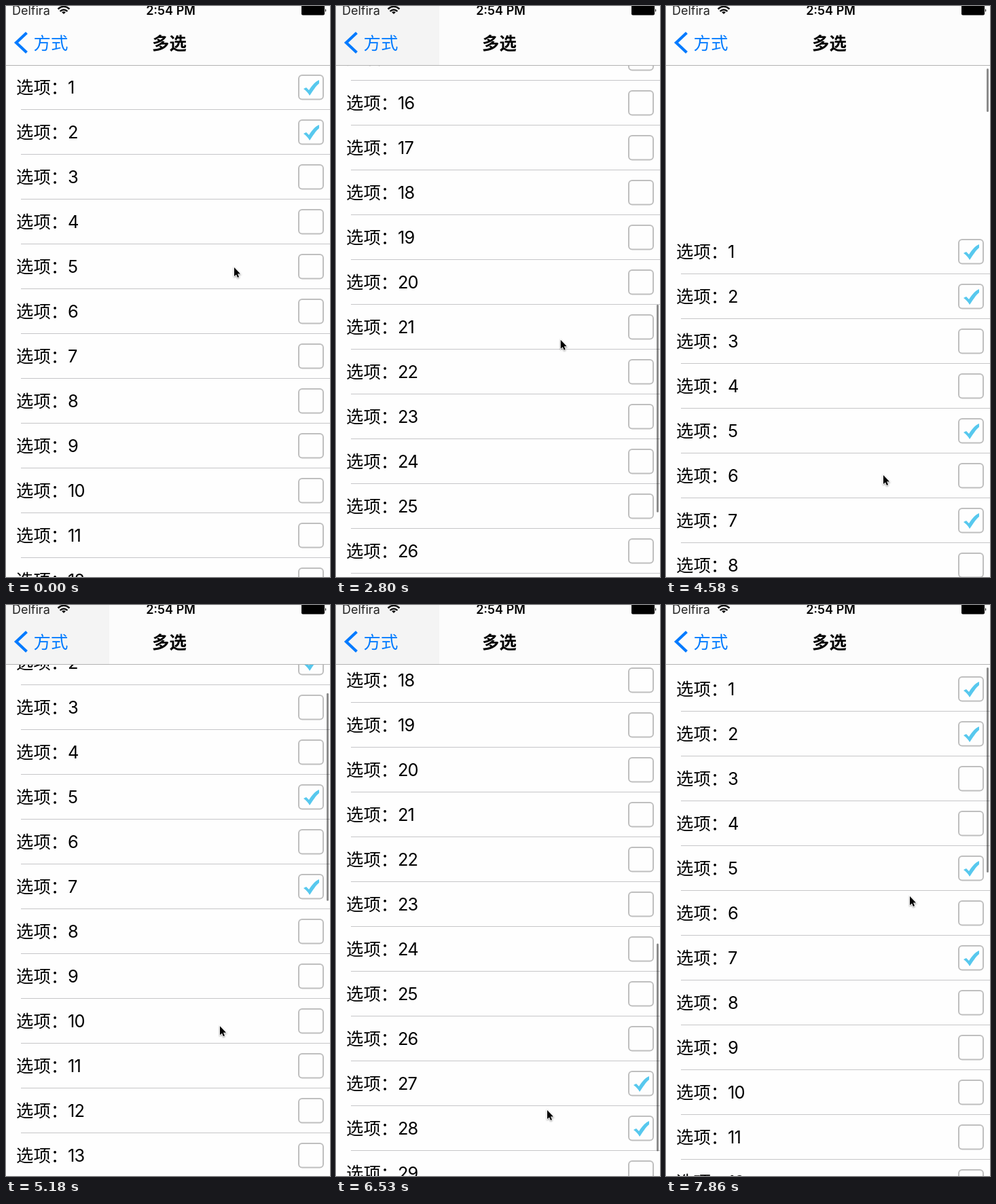
These frames come from a looping animation (477 px wide and 841 px high, 8 s). An HTML page:

```html
<!DOCTYPE html>
<html lang="zh-CN">
<head>
<meta charset="utf-8">
<title>多选</title>
<style>
  html, body { margin: 0; width: 100%; height: 100%; overflow: hidden; background: #fefefe; }
  svg { display: block; width: 100vw; height: 100vh; }
  text { font-family: Inter, Roboto, sans-serif; }
  .cjk { font-family: "Noto Sans CJK SC", "Noto Sans CJK JP", "Noto Sans CJK", sans-serif; font-size: 25.4px; }
  .number { font-size: 25.4px; letter-spacing: -.9px; }
  .box { fill: #fefefe; stroke: #bfbfbf; stroke-width: 2; }
  .line { fill: #c6c6c8; }
  #cursor { filter: drop-shadow(0 1px 1px #0006); }
</style>
</head>
<body>
<svg viewBox="0 0 477 841" preserveAspectRatio="none">
  <defs>
    <path id="tick" fill="#57c8ee"
      d="M438 35 L442 33 L446 37 C450 31 454 25 461 22 V27 C456 31 452 38 447 45 C445 41 442 38 438 35Z"/>
  </defs>
  <rect width="477" height="841" fill="#fefefe"/>
  <g id="list"></g>
  <rect id="bar" x="472" width="3" rx="1.5"/>

  <rect width="477" height="87" fill="#fcfcfc"/>
  <rect id="shade" width="152" height="87" fill="#f4f4f4"/>
  <rect y="87" width="477" height="1" fill="#b2b2b2"/>
  <text x="9" y="12.5" font-size="18" fill="#222">Delfira</text>
  <g fill="none" stroke="#111" stroke-width="2.4">
    <path d="M76.5 4.5 Q85 -3 93.5 4.5 M79.5 7.8 Q85 3 90.500 7.8"/>
    <path d="M82 9 Q85 7 88 9 L85 12Z" fill="#111" stroke="none"/>
  </g>
  <text x="242.5" y="12.5" font-size="18" font-weight="600" text-anchor="middle">2:54 PM</text>
  <rect x="435" y="-2" width="34" height="15.5" rx="2"/>
  <path d="M470 4 Q472.5 6.5 470 9Z"/>
  <path d="M30.5 39.5 L15 54 L30.5 68.5" fill="none" stroke="#007aff" stroke-width="4.2"/>
  <text class="cjk" x="40.5" y="63.5" fill="#007aff">方式</text>
  <text class="cjk" x="240.5" y="63.5" font-weight="700" text-anchor="middle">多选</text>

  <path id="cursor" d="M0 1 V14 L3 11.500 L5 16 L7 15 L5 10.500 H9Z"
    stroke="#fff" stroke-width="1.5" paint-order="stroke"/>
</svg>
<script>
const LOOP = 8000, STEP = 148.2, LEAD = 16, LAST = 53;
const ROWS = 30, ROW_H = 66, TOP = 87, MAX = 1224, BAR_H = 306;
const $ = id => document.getElementById(id);

// Option: step at which it becomes checked
const checkedAt = { 1: 0, 2: 0, 5: 4, 7: 7, 27: 41, 28: 42 };

// Gesture ends: step, list offset, pointer x and y
const keys = [
  [0, 0, 336, 384], [3, 0, 441, 380], [4, 0, 441, 380], [7, 0, 441, 511], [8, 0, 400, 505],
  [15, 233, 290, 407], [21, MAX, 345, 520], [23, MAX, 373, 699], [31, -242, 320, 690],
  [34, 0, 316, 640], [39, 971, 306, 440], [41, MAX, 441, 608], [42, MAX, 441, 672],
  [44, 1131, 311, 743], [LAST, -4, 359, 428]];

const clamp = v => Math.min(1, Math.max(0, v));

function pose(k) {
  const i = Math.max(1, keys.findIndex(p => p[0] >= k));
  const a = keys[i - 1], b = keys[i];
  const u = clamp((k - a[0]) / (b[0] - a[0])), e = u * u * (3 - 2 * u);
  const [, y, px, py] = a.map((v, j) => v + (b[j] - v) * e);
  return { y: Math.round(y), px, py };
}

// Fades out over three steps once the list rests
function barStrength(k) {
  let idle = 0;
  while (idle < 3 && pose(k - idle).y === pose(k - idle - 1).y) idle++;
  return 1 - idle / 3;
}

$('list').innerHTML = Array.from({ length: ROWS }, (_, i) => `
  <g transform="translate(0 ${i * ROW_H})">
    <text class="cjk" x="15" y="41.5">选项：</text>
    <text class="number" x="91" y="41.5">${i + 1}</text>
    <rect class="box" x="431" y="15" width="36" height="35.5" rx="5"/>
    ${i + 1 in checkedAt ? `<use href="#tick" id="tick${i + 1}"/>` : ''}
    <rect class="line" x="22" y="65" width="455" height="1"/>
  </g>`).join('');

function set(id, attrs) {
  for (const name in attrs) $(id).setAttribute(name, attrs[name]);
}

function render(t) {
  const k = Math.min(LAST, Math.floor((t + LEAD) / STEP));
  const { y, px, py } = pose(k);
  set('list', { transform: `translate(0 ${TOP - y})` });
  for (const n in checkedAt)
    set('tick' + n, { visibility: k >= checkedAt[n] ? 'visible' : 'hidden' });

  // The bar shrinks while the list is pulled past its top
  set('bar', {
    y: y < 0 ? 92 : 93.5 + .358 * y,
    height: BAR_H + Math.min(0, y),
    opacity: .45 * barStrength(k)
  });
  set('shade', { opacity: y > ROW_H ? 1 : 0 });
  set('cursor', { transform: `translate(${px} ${py})` });
}

const start = performance.now();
function tick(now) {
  render(Math.max(0, now - start) % LOOP);
  requestAnimationFrame(tick);
}
render(0);
requestAnimationFrame(tick);
</script>
</body>
</html>
```
